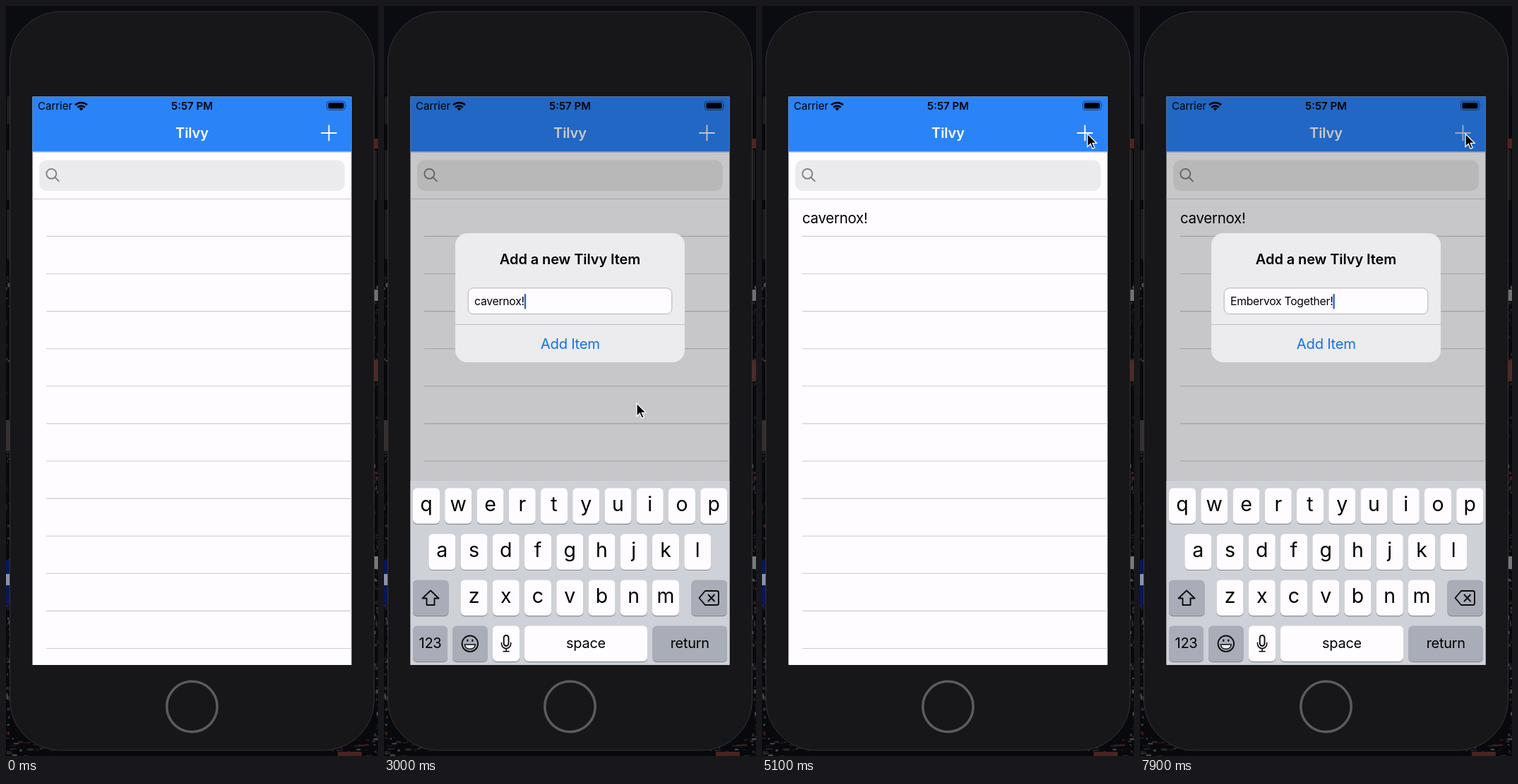
These frames come from a looping animation (527 by 1063 pixels, 8000 ms). An HTML page:

```html
<!DOCTYPE html>
<html lang="en">
<head>
<meta charset="utf-8">
<title>List app</title>
<style>
  html, body { margin: 0; width: 100%; height: 100%; overflow: hidden; background: #08090d; }
  svg { display: block; width: 100%; height: 100%; }
  text { font: 400 20px Inter, "Open Sans", sans-serif; letter-spacing: -.015em; white-space: pre; }
  .mid { text-anchor: middle; }
  .bold { font-weight: 600; letter-spacing: -.005em; }
  .status { font-size: 15px; letter-spacing: 0; }
  .field { font-size: 15.7px; }
  .letter { font-size: 28.5px; letter-spacing: 0; }
  .line { fill: none; stroke-linecap: round; stroke-linejoin: round; }
</style>
</head>
<body>
<svg viewBox="0 0 527 1063">
  <defs>
    <clipPath id="screen"><rect x="37.5" y="128.500" width="452" height="805.500"/></clipPath>
  </defs>

  <rect width="527" height="1063" fill="#08090d"/>
  <rect width="527" height="125" fill="#0a0c12"/>
  <g id="city"></g>

  <g fill="#1d1c1f" stroke="#050506">
    <rect x=".5" y="127.500" width="10" height="41" rx="2"/>
    <rect x=".5" y="203.500" width="10" height="72" rx="2"/>
    <rect x=".5" y="287.500" width="10" height="72" rx="2"/>
    <rect x="516" y="203.500" width="10" height="72" rx="2"/>
  </g>
  <rect x="5.500" y="8" width="516" height="1047" rx="72" fill="#171619" stroke="#343438"/>
  <circle cx="263.500" cy="993" r="35.700" fill="none" stroke="#5c5b5e" stroke-width="3.500"/>

  <g clip-path="url(#screen)">
    <rect x="37" y="128" width="453" height="807" fill="#fefcff"/>
    <rect x="37" y="128" width="453" height="78.500" fill="#2b83f8"/>
    <path d="M37 207H490" stroke="#a9b6cc"/>
    <text class="mid bold" x="263.500" y="187" fill="#fff">Tilvy</text>
    <path id="plus" class="line" d="M447 180h21m-10.500-10.500v21" stroke="#fff" stroke-width="1.900"/>
    <rect x="47" y="218.500" width="433" height="43.500" rx="11" fill="#ebeaec"/>
    <g class="line" stroke="#7d7c80" stroke-width="1.800">
      <circle cx="64.300" cy="237.800" r="7"/><path d="M69.500 243l5.500 5.300"/>
    </g>
    <path id="rules" stroke="#cdccd0" stroke-width="1.100"/>
    <text id="row" x="57" y="308" style="font-size:20.500px">cavernox!</text>
    <rect id="dim" x="37" y="128" width="453" height="807"/>

    <text class="status" x="45" y="147">Carrier</text>
    <g class="line" stroke="#000" stroke-width="2.600" style="stroke-linecap:butt">
      <path d="M98 140.300a12.500 12.500 0 0 1 17 0M101.200 143.600a8 8 0 0 1 10.600 0"/>
      <path d="M103.500 145.200a4.600 4.600 0 0 1 6 0l-3 3.300z" fill="#000" stroke="none"/>
    </g>
    <text class="status mid bold" x="263.500" y="147">5:57 PM</text>
    <rect x="454.500" y="135" width="26" height="12.500" rx="3.500" fill="none" stroke="#000" stroke-opacity=".5"/>
    <rect x="456.500" y="137" width="22" height="8.500" rx="2"/>
    <path d="M482 139.200q1.600 2 0 4z" opacity=".5"/>

    <g id="alert">
      <rect x="101" y="322" width="325" height="183" rx="17" fill="#ecebee"/>
      <text class="mid bold" x="263.500" y="365.500">Add a new Tilvy Item</text>
      <rect x="119.200" y="399.800" width="288.600" height="36.700" rx="7.500" fill="#fefcff" stroke="#b2b1b6"/>
      <path d="M101 451.500h325" stroke="#c0bfc4"/>
      <text class="mid" x="263.800" y="486" fill="#1273e8" style="font-size:20.300px">Add Item</text>
      <text id="hint" class="field" x="128.500" y="424" fill="#c3c2c7">Add a new note!</text>
      <text id="typed" class="field" x="128" y="424"></text>
      <rect id="caret" y="408" width="2.400" height="21.500" rx="1" fill="#2f63d0"/>
    </g>

    <g id="keyboard">
      <rect x="37" y="673" width="453" height="264" fill="#ced1d7"/>
      <g id="keys"></g>
      <g class="line" stroke="#0c0c0e" stroke-width="1.900">
        <path d="M66 828.500l11.500 11h-6v9.500h-11v-9.500h-6z"/>
        <path d="M455 829h16.500q2.500 0 2.500 2.500v15q0 2.500-2.500 2.500h-16.500l-8.500-10zM459.500 834.500l8.500 9m0-9l-8.500 9"/>
        <circle cx="121.800" cy="903.800" r="11.300"/>
        <path d="M114.300 905h15c-.500 8.500-14.500 8.500-15 0z" fill="#eceef2" stroke-width="1.500"/>
        <path d="M118.300 898.500v1.500m7-1.500v1.500" stroke-width="2.200"/>
        <rect x="169.700" y="892" width="6.800" height="15" rx="3.400"/>
        <path d="M166.500 902.500v1.500a6.600 6.600 0 0 0 13.200 0v-1.500m-6.600 8.300v4m-4 0h8" stroke-width="1.600"/>
      </g>
    </g>
  </g>

  <path id="pointer" d="M0 0v18.400l4.300-4 2.900 6.800 3-1.300-2.900-6.600h5.800z" stroke="#fff" stroke-width="1.300"/>
</svg>

<script>
const $ = id => document.getElementById(id);
const LOOP = 8000, STEP = 100;

function add(parent, tag, attrs, text = '') {
  const node = document.createElementNS('http://www.w3.org/2000/svg', tag);
  for (const name in attrs) node.setAttribute(name, attrs[name]);
  node.textContent = text;
  return parent.appendChild(node);
}
const box = (parent, x, y, width, height, fill, rx = 0) =>
  add(parent, 'rect', { x, y, width, height, fill, rx });

// City lights beside the phone
let seed = 7;
const random = () => (seed = seed * 16807 % 2147483647) / 2147483647;
const city = $('city');
const tones = ['#1c1d22', '#2b2b30', '#131419', '#4a4a4e', '#3a211c'];
for (let i = 0; i < 150; i++) {
  const right = i % 2, y = 360 + random() * 700;
  box(city, right ? 521 + random() * 5 : random() * 4, y, 1 + random() * 3, 1 + random() * 5, tones[i % 5]);
}
for (let i = 0; i < 60; i++) {
  const x = random() * 70;
  box(city, i % 2 ? 527 - x : x, 1035 + random() * 28, 2 + random() * 7, 1 + random() * 2, tones[(i * 3) % 5]);
}
box(city, 0, 587, 5, 44, '#35302f');
box(city, 0, 785, 5, 64, '#081758');
box(city, 0, 805, 5, 16, '#8a93a8');
box(city, 522, 188, 5, 14, '#5a2018');
box(city, 522, 402, 5, 16, '#707074');
box(city, 522, 502, 5, 30, '#54291f');
box(city, 522, 780, 5, 18, '#77787c');
box(city, 470, 1057, 34, 6, '#4a2320');

// List separators
let rules = 'M37 273.500H490';
for (let i = 0; i < 12; i++) rules += `M57 ${326.4 + i * 53.1}H490`;
$('rules').setAttribute('d', rules);

// Keyboard
function key(x, y, width, label = '', gray = false) {
  const keys = $('keys');
  box(keys, x, y + 1.2, width, 50.6, '#888b92', 6);
  box(keys, x, y, width, 50.6, gray ? '#a8adb7' : '#fefcff', 6);
  const letter = label.length === 1;
  add(keys, 'text', { class: letter ? 'mid letter' : 'mid', x: x + width / 2, y: y + (letter ? 32.3 : 31.6) }, label);
}
[['qwertyuiop', 41], ['asdfghjkl', 63.3], ['zxcvbnm', 108.5]].forEach(([letters, x], row) =>
  [...letters].forEach((c, i) => key(x + i * 45.25, 683.2 + row * 65.1, 38, c)));
key(41, 813.4, 50.5, '', true);
key(435.5, 813.4, 50.5, '', true);
key(41, 878.5, 49, '123', true);
key(97, 878.5, 49.5, '', true);
key(154, 878.5, 38, '');
key(199, 878.5, 174, 'space');
key(380.5, 878.5, 105.5, 'return', true);

// Motion
const path = [
  [400, 530, 470], [900, 461, 181], [1050, 461, 181], [1300, 455, 252],
  [1700, 358, 563], [3500, 358, 563], [4200, 488, 225], [4500, 488, 225],
  [4800, 450, 160], [5100, 461, 181], [LOOP, 461, 181]
];

function pointerAt(t) {
  const i = Math.max(1, path.findIndex(p => p[0] >= t));
  const [t0, x0, y0] = path[i - 1], [t1, x1, y1] = path[i];
  const u = (t - t0) / (t1 - t0), e = u * u * (3 - 2 * u);
  return [x0 + (x1 - x0) * e, y0 + (y1 - y0) * e];
}

function spring(t, start, speed) {
  const a = Math.max(0, t - start) * speed / 1000;
  return 1 - (1 + a) * Math.exp(-a);
}

function typedAt(t) {
  if (t < 5300) {
    const count = t < 2000 ? 0 : t < 2500 ? (t - 1900) / 100 : t < 2600 ? 5 : (t - 2000) / 100;
    return 'cavernox!'.slice(0, count);
  }
  const count = t < 6500 ? 0 : t < 6800 ? 1 : 2 + (t - 6800) * 16 / 1100;
  return 'Embervox Together!'.slice(0, Math.floor(count + 1e-6));
}

function draw(t) {
  const second = t >= 5300;
  const open = spring(t, second ? 5320 : 1020, 19.3);
  const close = second ? 0 : spring(t, 3000, 21);
  const shown = Math.min(1, open * 1.03) * (1 - Math.min(1, close * 1.05));
  const lift = open * (1 - close);

  $('dim').setAttribute('opacity', shown * .215);
  $('plus').setAttribute('opacity', 1 - shown * (t >= 2000 && !second ? .05 : .3));
  $('row').setAttribute('visibility', t >= 3400 ? 'visible' : 'hidden');

  const scale = 1 + (1 - open) * .2;
  $('alert').setAttribute('opacity', shown);
  $('alert').setAttribute('transform',
    `translate(263.5 ${413.5 + (1 - open) * 131}) scale(${scale}) translate(-263.5 -413.5)`);
  $('keyboard').setAttribute('transform', `translate(0 ${(1 - lift) * 264})`);

  const text = typedAt(t);
  $('typed').textContent = text;
  $('hint').setAttribute('visibility', text ? 'hidden' : 'visible');
  $('caret').setAttribute('x', 128 + (text ? $('typed').getComputedTextLength() : 0));

  $('pointer').setAttribute('visibility', t >= 400 ? 'visible' : 'hidden');
  $('pointer').setAttribute('transform', `translate(${pointerAt(t)})`);
}

const begin = performance.now();
function frame() {
  const t = (performance.now() - begin) % LOOP;
  draw(Math.floor(t / STEP) * STEP);
  requestAnimationFrame(frame);
}
frame();
</script>
</body>
</html>
```
